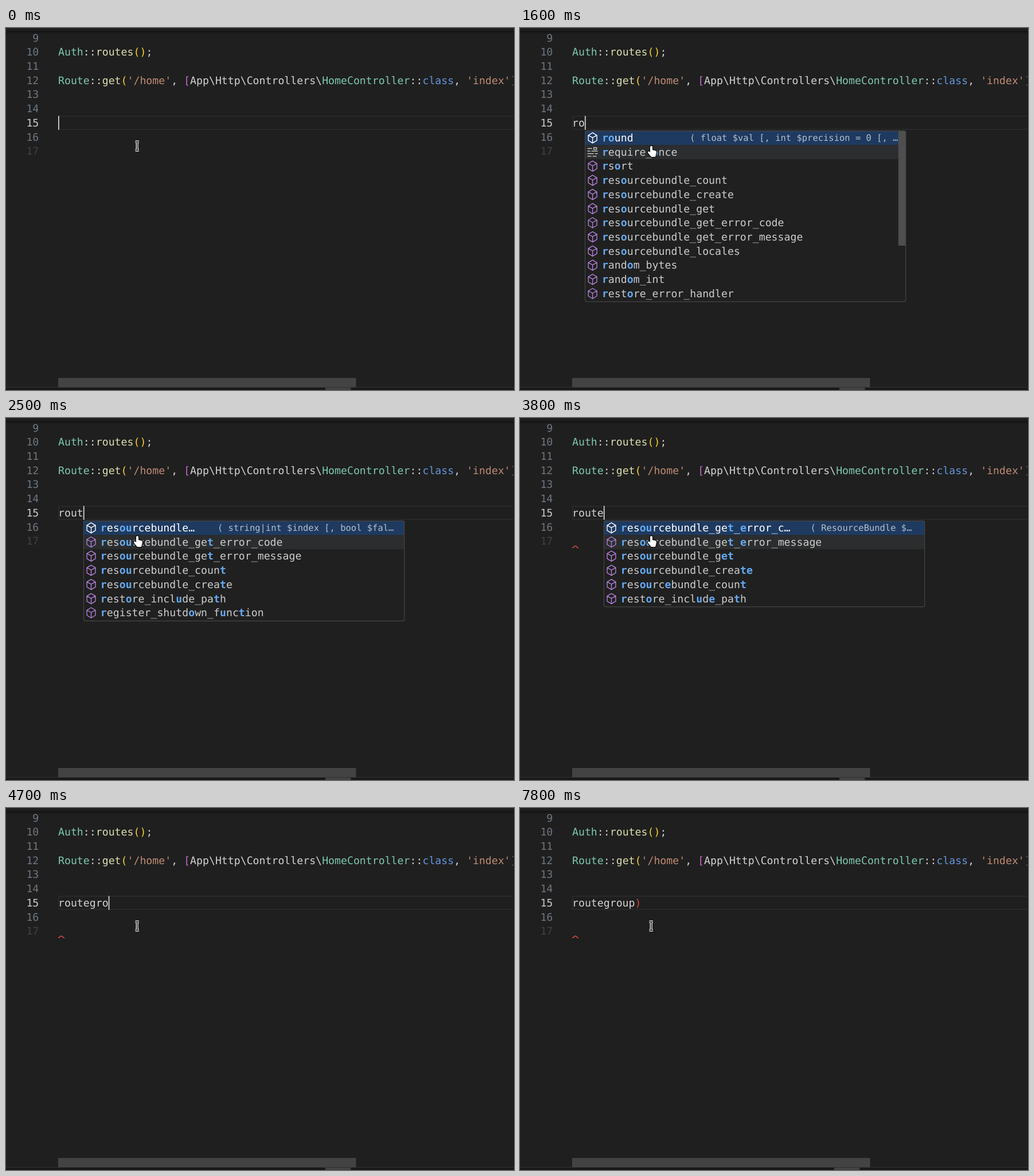
An HTML page with a canvas for the animation above (8000 ms loop, 886 by 632 pixels).

```html
<!DOCTYPE html>
<html lang="en">
<head>
<meta charset="utf-8">
<title>Editor autocomplete</title>
<style>
  html, body { margin: 0; width: 100%; height: 100%; overflow: hidden; background: #1f1f1f; }
  canvas { display: block; }
</style>
</head>
<body>
<canvas id="stage" width="886" height="632"></canvas>
<script>
const ctx = document.getElementById('stage').getContext('2d');
const LOOP = 8000, SIZE = 18.2, CELL = SIZE * 0.602, ROW = 24.7, LEFT = 91;
const PLAIN = '#d2d2d2', TEAL = '#7ec8b0', YELLOW = '#dcdcaf', GOLD = '#f8d030',
      STRING = '#c08b74', ORCHID = '#c565c8', BLUE = '#6496db', MATCH = '#64a9f3';

const routesLine = [['Auth', TEAL], ['::', PLAIN], ['routes', YELLOW], ['()', GOLD], [';', PLAIN]];
const homeLine = [['Route', TEAL], ['::', PLAIN], ['get', YELLOW], ['(', GOLD], ["'/home'", STRING],
  [', ', PLAIN], ['[', ORCHID], ['App\\Http\\Controllers\\', PLAIN], ['HomeController', TEAL],
  ['::', PLAIN], ['class', BLUE], [', ', PLAIN], ["'index'", STRING], [']', '#7b6d7c']];

// Capital letters in item names mark the matched characters.
const menus = {
  ro: {
    items: 'ROund Require_Once RsOrt ResOurcebundle_count ResOurcebundle_create ResOurcebundle_get ' +
      'ResOurcebundle_get_error_code ResOurcebundle_get_error_message ResOurcebundle_locales ' +
      'RandOm_bytes RandOm_int RestOre_error_handler',
    detail: '( float $val [, int $precision = 0 [, …', end: 546.5, scroll: true
  },
  rou: {
    items: 'ROUnd ResOUrcebundle_count ResOUrcebundle_create ResOUrcebundle_get ' +
      'ResOUrcebundle_get_error_code ResOUrcebundle_get_error_message ResOUrcebundle_locales ' +
      'RestOre_inclUde_path Register_shutdOwn_fUnction Readline_cOmpletion_fUnction ' +
      'get_ResOUrces get_ResOUrce_type',
    detail: '( float $val [, int $precision = 0 [, …', end: 546.5
  },
  rout: {
    items: 'ResOUrcebundle… ResOUrcebundle_geT_error_code ResOUrcebundle_geT_error_message ' +
      'ResOUrcebundle_counT ResOUrcebundle_creaTe RestOre_inclUde_paTh Register_shutdOwn_fUncTion',
    detail: '( string|int $index [, bool $fal…', end: 541.5
  },
  route: {
    items: 'ResOUrcebundle_geT_Error_c… ResOUrcebundle_geT_Error_message ResOUrcebundle_gET ' +
      'ResOUrcebundle_creaTE ResOUrcEbundle_counT RestOre_inclUdE_paTh',
    detail: '( ResourceBundle $…', end: 537.7
  },
  routeg: { items: 'ResOUrcebundle_geT_Error_mes…', detail: '( ResourceBundle…', end: 537.7 },
  routegr: { items: 'ResOUrcebundle_geT_ERror_mes…', detail: '( ResourceBundle…', end: 537.7, sash: true }
};

// [start, typed text, caret shown, menu open]
const steps = [
  [0, '', 1, 0], [300, '', 0, 0], [800, '', 1, 0], [1300, '', 0, 0],
  [1400, 'r', 1, 0], [1500, 'ro', 1, 0], [1600, 'ro', 1, 1], [2000, 'rou', 1, 1],
  [2500, 'rout', 1, 1], [2700, 'route', 1, 1], [3200, 'route', 0, 1], [3700, 'route', 1, 1],
  [4100, 'routeg', 1, 1], [4500, 'routegr', 1, 1], [4600, 'routegro', 1, 0],
  [5200, 'routegro', 0, 0], [5500, 'routegrou', 1, 0], [6000, 'routegroup', 1, 0],
  [6400, 'routegroup', 0, 0], [6900, 'routegroup', 1, 0], [7400, 'routegroup)', 1, 0],
  [7800, 'routegroup)', 0, 0]
];

const pointers = {
  beam: new Path2D('M225.5 198.5h2.2l1 1 1-1h2.2M228.7 199v14M225.5 213.5h2.2l1-1 1 1h2.2'),
  hand: new Path2D('M227 208q0-2 2-2t2 2v5l5 1q2 .5 2 3l-1 4-1 4h-7l-5-6q-2-3 0-3.500t3 2z'),
  resize: new Path2D('M228.500 199.500q-4 3-4 5.500 1 2 2.500 2.500v2q-2 1-2.500 2.500 1 3 4 3.500 3-.5 4-3.500-.5-1.500-2.500-2.500v-2q2-.5 2.500-2.500 0-2.500-4-5.500z')
};

function rect(x, y, w, h, color) {
  ctx.fillStyle = color;
  ctx.fillRect(x, y, w, h);
}

function text(str, x, y, color, size = SIZE, weight = '') {
  ctx.font = `${weight} ${size}px "DejaVu Sans Mono", monospace`;
  ctx.fillStyle = color;
  ctx.fillText(str, x, y);
}

function runs(parts, x, y) {
  for (const [str, color, weight] of parts) {
    text(str, x, y, color, SIZE, weight);
    x += str.length * CELL;
  }
}

const baseline = line => 171.8 + (line - 15) * ROW;

function drawEditor(t, typed, caret) {
  rect(0, 0, 886, 632, '#1f1f1f');
  const shade = ctx.createLinearGradient(0, 4, 0, 11);
  shade.addColorStop(0, '#111');
  shade.addColorStop(1, '#1f1f1f');
  rect(0, 5, 886, 6, shade);

  ctx.strokeStyle = '#292929';
  ctx.lineWidth = 2;
  ctx.strokeRect(92, 154, 800, 23);

  for (let n = 9; n <= 17; n++) {
    const label = String(n);
    text(label, 57.3 - label.length * CELL, baseline(n),
      n === 15 ? '#cccccc' : n === 17 ? '#3e4145' : '#6e7681');
  }
  runs(routesLine, LEFT, baseline(10));
  runs(homeLine, LEFT, baseline(12));
  runs([[typed.replace(')', ''), PLAIN], [typed.endsWith(')') ? ')' : '', '#cf4a38']], LEFT, baseline(15));
  if (caret) rect(LEFT + typed.length * CELL, 153.5, 1.8, 24.2, '#cfcfcf');

  if (t >= 3800) {
    ctx.strokeStyle = '#e04b45';
    ctx.lineWidth = 1.4;
    ctx.stroke(new Path2D('M91 226.500q2 0 3.500-2 2-2 4 0 1.500 2 3.500 2.500'));
  }
  rect(885, 6, 1, 621, '#141414');
  rect(91, 611, 519.500, 16, '#434343');
  rect(0, 627, 886, 1.300, '#303030');
  rect(0, 628.300, 886, 4, '#181818');
  rect(t < 5500 ? 557 : 548, 628, 44.500, 4, '#424242');
}

function drawCube(x, y, color) {
  ctx.strokeStyle = color;
  ctx.lineWidth = 1.4;
  ctx.lineJoin = 'round';
  ctx.beginPath();
  for (let i = 0; i < 6; i++) {
    const a = Math.PI * (i / 3 - 0.5);
    ctx.lineTo(x + 8.6 * Math.cos(a), y + 9 * Math.sin(a));
  }
  ctx.closePath();
  ctx.moveTo(x - 7.4, y - 4.5);
  ctx.lineTo(x, y - 0.5);
  ctx.lineTo(x + 7.4, y - 4.5);
  ctx.moveTo(x, y - 0.5);
  ctx.lineTo(x, y + 9);
  ctx.stroke();
}

function drawKeyword(x, y) {
  for (const [dx, dy, w] of [[-9, -7, 8], [-9, -2.500, 5], [-2, -2.500, 11], [-9, 2, 11], [4, 2, 5], [-9, 6.500, 7], [0, 6.500, 7]])
    rect(x + dx, y + dy, w, 1.4, '#cccccc');
  ctx.strokeStyle = '#cccccc';
  ctx.lineWidth = 1.3;
  ctx.strokeRect(x + 2, y - 8, 5, 3.500);
}

function drawMenu(typed) {
  const { items, detail, end, scroll, sash } = menus[typed];
  const names = items.split(' ');
  const x = LEFT + typed.length * CELL, top = 179.7, width = 560.5;
  const height = 2.3 + names.length * ROW;

  ctx.save();
  ctx.beginPath();
  ctx.roundRect(x, 179, width, height + 0.7, 3);
  ctx.clip();
  rect(x, 179, width, height + 1, '#202020');
  names.forEach((name, i) => {
    const y = top + i * ROW, selected = i === 0;
    if (i < 2) rect(x, y, width, ROW, selected ? '#1f3a60' : '#2b2d2e');
    if (name.startsWith('Require')) drawKeyword(x + 13.7, y + 12.3);
    else drawCube(x + 13.7, y + 12.1, selected ? '#ffffff' : '#b180d7');
    const parts = name.match(/[A-Z]+|[^A-Z]+/g).map(part => /[A-Z]/.test(part)
      ? [part.toLowerCase(), MATCH, 'bold']
      : [part, selected ? '#ffffff' : '#cccccc']);
    runs(parts, x + 30, y + 18.3);
  });
  const small = SIZE * 0.85;
  text(detail, x + end - detail.length * small * 0.602, top + 17.3, '#b4bfcc', small);
  if (scroll) rect(x + 547, 180, 13, 200, '#4f4f4f');
  ctx.restore();

  ctx.strokeStyle = '#454545';
  ctx.lineWidth = 1.2;
  ctx.beginPath();
  ctx.roundRect(x + 0.6, 179.6, width - 1.2, height - 0.5, 3);
  ctx.stroke();
  if (sash) rect(x + 1, 204.500, width - 1, 4.300, '#315b96');
}

function drawPointer(t) {
  const kind = t < 1600 || t >= 4700 ? 'beam' : t < 4100 ? 'hand' : 'resize';
  const path = pointers[kind];
  ctx.lineJoin = 'round';
  const stroke = (color, width) => {
    ctx.strokeStyle = color;
    ctx.lineWidth = width;
    ctx.stroke(path);
  };
  if (kind === 'beam') {
    stroke('#ffffff', 4);
    stroke('#111111', 1.5);
  } else if (kind === 'hand') {
    stroke('#111111', 3);
    ctx.fillStyle = '#ffffff';
    ctx.fill(path);
  } else {
    stroke('#ffffff', 2.6);
    ctx.fillStyle = '#111111';
    ctx.fill(path);
  }
}

function draw(now) {
  const t = now % LOOP;
  const [, typed, caret, open] = steps.findLast(step => step[0] <= t);
  drawEditor(t, typed, caret);
  if (open) drawMenu(typed);
  drawPointer(t);
}

function tick() {
  draw(performance.now());
  requestAnimationFrame(tick);
}

ctx.textRendering = 'geometricPrecision';
tick();
</script>
</body>
</html>
```
